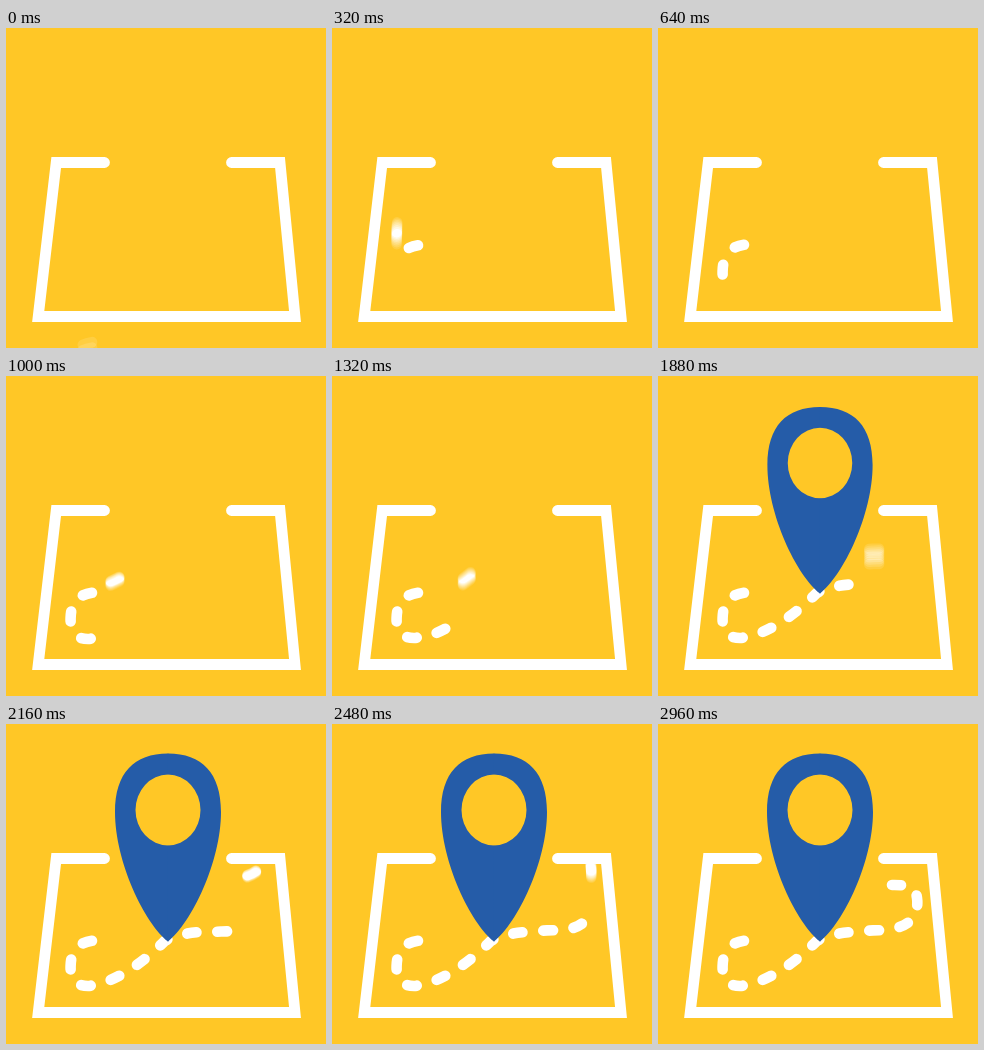
Animation of 320 by 320 pixels, one loop 4080 ms. Source, as an HTML page with a canvas:

```html
<!DOCTYPE html>
<html lang="en">
<head>
<meta charset="utf-8">
<title>Map pin</title>
<style>
  html, body { margin: 0; width: 100%; height: 100%; overflow: hidden; background: #ffc726; }
  canvas { display: block; width: 320px; height: 320px; }
</style>
</head>
<body>
<canvas id="stage"></canvas>
<script>
const LOOP = 4080, STEP = 40, SHUTTER = 20, SAMPLES = 8, SIZE = 320;
const YELLOW = '#ffc726', BLUE = '#255ca8';
const DASHES = 11, DASH = 9.5, STAGGER = 230;
const TIP = { x: 162, y: 217.5 };
const dpr = window.devicePixelRatio || 1;

function prepare(canvas) {
  canvas.width = canvas.height = SIZE * dpr;
  const c = canvas.getContext('2d');
  c.scale(dpr, dpr);
  return c;
}
const ctx = prepare(document.getElementById('stage'));
const layer = prepare(document.createElement('canvas'));

const board = new Path2D('M98.5 134.5H50.2L32.2 288.5H289L274 134.5H225.5');

// One half of the pin, mirrored by drawing it twice
const halfPin = new Path2D(
  'M162.3 217.5H162C138.5 199 109 138 109 88C109 49 128 29.5 162 29.5H162.3' +
  'V50.5H162A32.5 35.5 0 0 0 162 121.5H162.3Z');

// The route, cut into evenly spaced dashes
const routeData = 'M86 216.8C72 219 65 226 64.6 242C64.2 256 70 262 82 262' +
  'C108 259.5 137 239 158.5 217.2C170 209.5 190 208 215 206.4' +
  'C245 206.5 260 198 259.3 177C258.5 163 252 160 234 160.3';
const route = new Path2D(routeData);
const ruler = document.createElementNS('http://www.w3.org/2000/svg', 'path');
ruler.setAttribute('d', routeData);
const routeLength = ruler.getTotalLength();
const spacing = (routeLength - DASH) / (DASHES - 1);

// The first two dashes lead, the others follow after a short pause
const startOf = i => 8 + i * STAGGER + (i < 2 ? 0 : 192);

// Vertical offset: fast rise, damped swing above the rest position, faint rebound
function lift(age) {
  const t = age - 45, swing = 245;
  if (t < 0) return -2.2 * t;
  if (t > 2 * swing) return 0;
  const y = -98 * Math.sin(Math.PI * t / swing) * Math.exp(-0.006 * t);
  return t > swing ? y * 0.1 : y;
}

function drawDash(c, i, t) {
  const age = t - startOf(i);
  if (age < -20) return;
  c.save();
  c.translate(0, lift(age));
  c.strokeStyle = '#fff';
  c.lineWidth = 10.6;
  c.lineCap = 'round';
  c.setLineDash([DASH, 2 * routeLength]);
  c.lineDashOffset = -i * spacing;
  c.stroke(route);
  c.restore();
}

function drawPin(c, t) {
  const p = Math.min(1, Math.max(0, (t - 1451) / 533));
  if (!p) return;
  const s = 1 - (1 - p) ** 3;
  const whole = new Path2D(halfPin);
  whole.addPath(halfPin, new DOMMatrix([-1, 0, 0, 1, 2 * TIP.x, 0]));
  c.save();
  c.translate(TIP.x, TIP.y);
  c.scale(s, s);
  c.translate(-TIP.x, -TIP.y);
  c.fillStyle = BLUE;
  c.fill(halfPin);
  c.translate(2 * TIP.x, 0);
  c.scale(-1, 1);
  c.fill(halfPin);
  c.restore();
}

// Average several moments inside the shutter to get motion blur
function blurred(draw, t) {
  layer.clearRect(0, 0, SIZE, SIZE);
  layer.globalCompositeOperation = 'lighter';
  layer.globalAlpha = 1 / SAMPLES;
  for (let k = 0; k < SAMPLES; k++) {
    draw(layer, t + ((k + 0.5) / SAMPLES - 0.5) * SHUTTER);
  }
  ctx.drawImage(layer.canvas, 0, 0, SIZE, SIZE);
}

function paint(draw, t, from, to) {
  if (t < from) return;
  if (t < to) blurred(draw, t);
  else draw(ctx, t);
}

function render(t) {
  ctx.fillStyle = YELLOW;
  ctx.fillRect(0, 0, SIZE, SIZE);
  ctx.strokeStyle = '#fff';
  ctx.lineWidth = 10.8;
  ctx.lineCap = 'round';
  ctx.lineJoin = 'miter';
  ctx.stroke(board);
  for (let i = 0; i < DASHES; i++) {
    const s = startOf(i);
    paint((c, at) => drawDash(c, i, at), t, s - 15, s + 300);
  }
  paint(drawPin, t, 1441, 1800);
}

const begin = performance.now();
let last = -1;
function tick() {
  const t = Math.floor((performance.now() - begin) % LOOP / STEP) * STEP;
  if (t !== last) render(last = t);
  requestAnimationFrame(tick);
}
tick();
</script>
</body>
</html>
```
